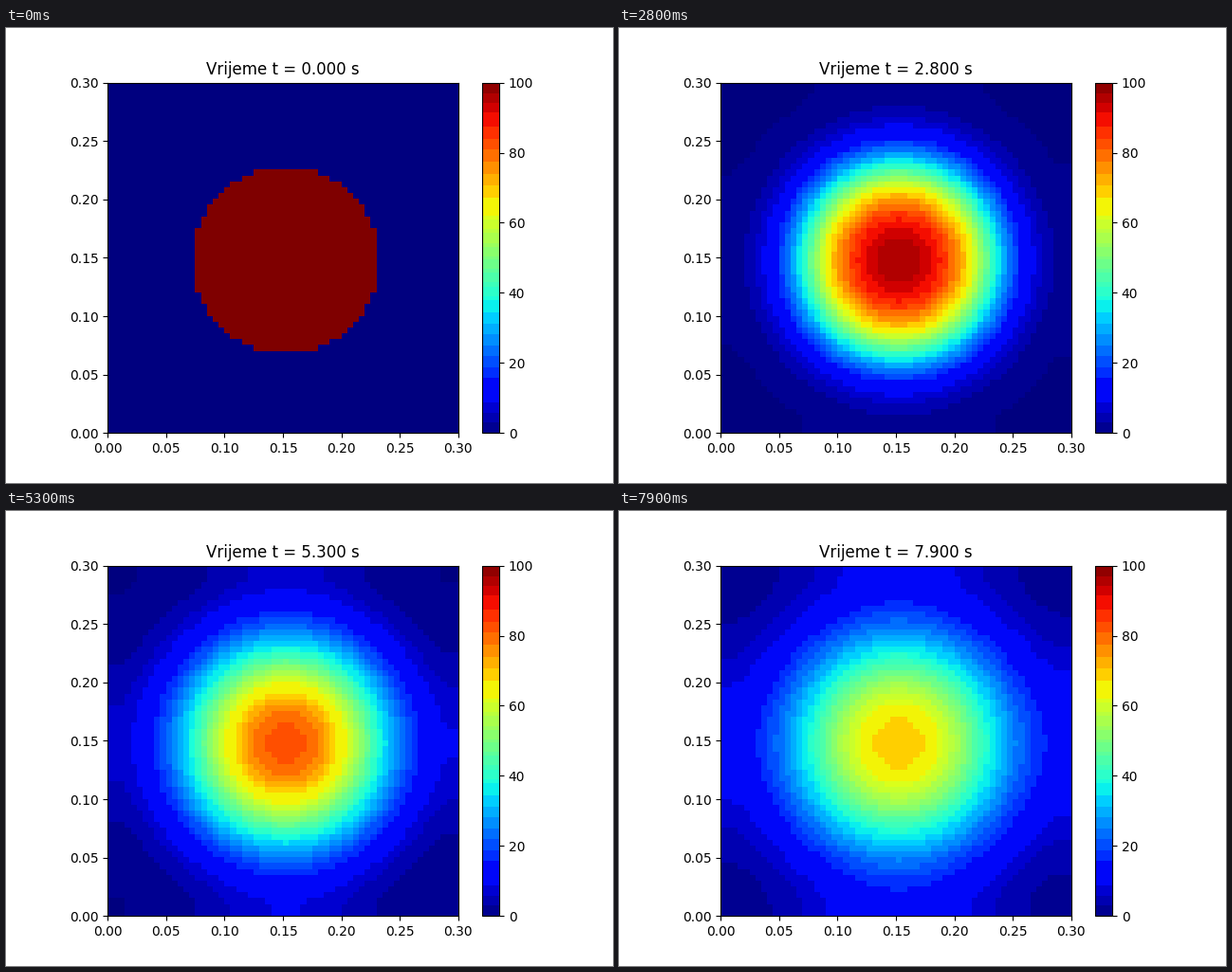
Animation, 640 px wide and 480 px high, one loop 8000 ms. Source, as a matplotlib script:

```python
import numpy as np
import matplotlib.pyplot as plt
from matplotlib.animation import FuncAnimation
from matplotlib.colors import ListedColormap

SIDE = 0.3            # plate edge, m
N = 60                # cells per edge
DIFFUSIVITY = 1.6563e-4
DT = 0.002            # solver step, s
FRAME_DT = 0.1
FRAMES = 80
HOT = 100.0


def banded_jet(bin_width=32):
    """Jet with neighbouring shades merged into one mean colour per RGB bin."""
    rgb = np.floor(plt.get_cmap("jet")(np.arange(256))[:, :3] * 255)
    _, group = np.unique(rgb // bin_width, axis=0, return_inverse=True)
    group = group.ravel()
    means = np.array([rgb[group == g].mean(axis=0) for g in range(group.max() + 1)])
    return ListedColormap(means[group] / 255)


def start_field():
    row, col = np.indices((N, N)) - N // 2
    return np.where(row**2 + col**2 < 16**2, HOT, 0.0)


def step(u, r):
    """Advance one explicit step with insulated edges."""
    mid = u[1:-1, 1:-1]
    flow = u[2:, 1:-1] + u[:-2, 1:-1] + u[1:-1, 2:] + u[1:-1, :-2] - 4 * mid
    return np.pad(mid + r * flow, 1, mode="edge")


def solve():
    r = DIFFUSIVITY * DT / (SIDE / N) ** 2
    u = start_field()
    fields = [u]
    for _ in range(FRAMES - 1):
        for _ in range(round(FRAME_DT / DT)):
            u = step(u, r)
        fields.append(u)
    return fields


fields = solve()

fig, ax = plt.subplots(figsize=(6.4, 4.8), dpi=100)
image = ax.imshow(fields[0], cmap=banded_jet(), vmin=0, vmax=HOT,
                  extent=[0, SIDE, 0, SIDE], interpolation="nearest")
fig.colorbar(image)
title = ax.set_title("")


def draw(i):
    image.set_data(fields[i])
    title.set_text(f"Vrijeme t = {i * FRAME_DT:.3f} s")
    return image, title


anim = FuncAnimation(fig, draw, frames=FRAMES, interval=100, repeat=True,
                     repeat_delay=0, blit=False)
plt.show()
```
